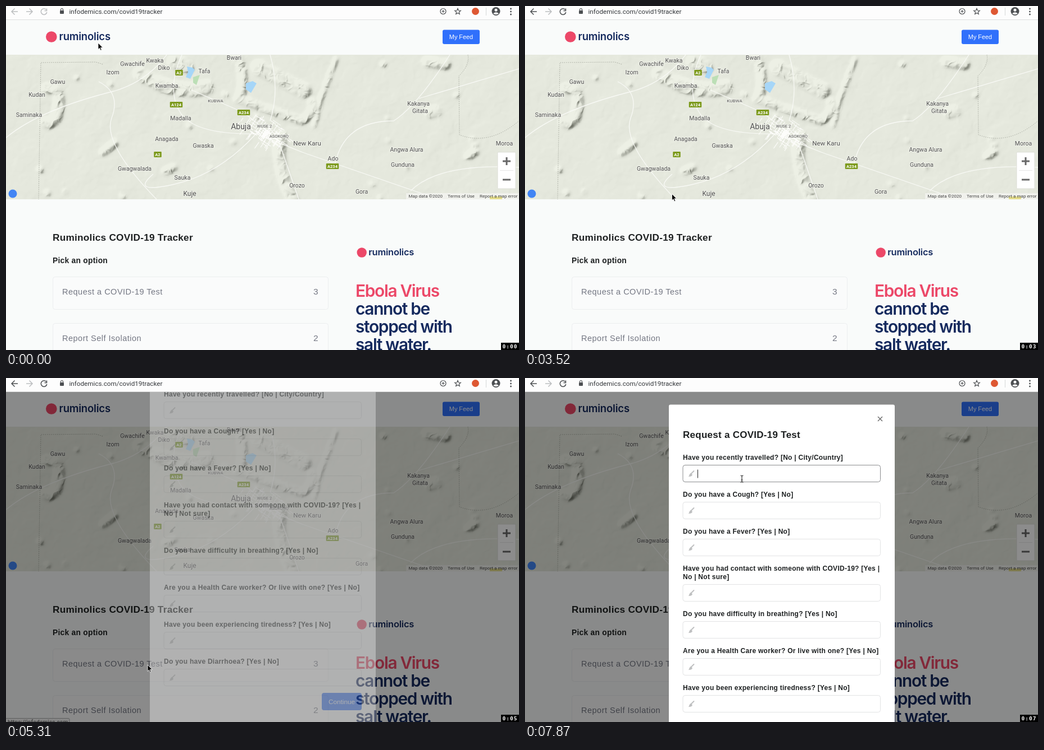
Animation of 913x614 px, one loop 8 s. Source, as an HTML page with a canvas:

```html
<!DOCTYPE html>
<html lang="en">
<head>
<meta charset="utf-8">
<title>Tracker walkthrough</title>
<style>
  html, body { margin: 0; width: 100%; height: 100%; overflow: hidden; background: #f9fbfa; }
  #stage { position: absolute; left: 0; top: 0; width: 913px; height: 614px; overflow: hidden; background: #f9fbfa; }
  #map { position: absolute; left: 0; top: 87px; }
  svg { position: absolute; left: 0; top: 0; }
  text { white-space: pre; }
  .page { font-family: "Liberation Sans", Arial, sans-serif; }
  .bold { font-weight: 700; letter-spacing: .27px; }
  .option { letter-spacing: .5px; }
  .brand { font-family: Inter, sans-serif; font-weight: 600; }
  .ui { font-family: Roboto, sans-serif; }
  .clock { font-family: "DejaVu Sans Mono", monospace; font-weight: 700; letter-spacing: 1px; }
  .place { font-family: Roboto, sans-serif; text-anchor: middle; paint-order: stroke; stroke: #f3f4ee; stroke-width: 2px; stroke-opacity: .75; }
  .mid { text-anchor: middle; }
</style>
</head>
<body>
<div id="stage">
  <canvas id="map" width="913" height="258"></canvas>
  <svg id="art" width="913" height="614" viewBox="0 0 913 614"></svg>
</div>
<script>
const LOOP = 8000, W = 913, MAP_H = 258, MAP_Y = 87;
const art = document.getElementById('art');

function el(parent, tag, attrs, content) {
  const node = document.createElementNS('http://www.w3.org/2000/svg', tag);
  for (const k in attrs) node.setAttribute(k, attrs[k]);
  if (content !== undefined) node.textContent = content;
  parent.appendChild(node);
  return node;
}
const group = () => el(art, 'g', {});
const rect = (p, x, y, width, height, fill, more) => el(p, 'rect', { x, y, width, height, fill, ...more });
const dot = (p, cx, cy, r, fill) => el(p, 'circle', { cx, cy, r, fill });
const line = (p, d, stroke, width = 1, more) =>
  el(p, 'path', { d, stroke, 'stroke-width': width, fill: 'none', ...more });
const text = (p, cls, s, x, y, size, fill, more) =>
  el(p, 'text', { class: cls, x, y, 'font-size': size, fill, ...more }, s);

// ---- Terrain: hill outlines are blurred into a mask, roughened and lit from the north-west ----
function hash(x, y) {
  let n = Math.imul(x, 374761393) + Math.imul(y, 668265263);
  n = Math.imul(n ^ (n >>> 13), 1274126177);
  return ((n ^ (n >>> 16)) >>> 0) / 4294967296;
}
function noise(x, y) {
  const ix = Math.floor(x), iy = Math.floor(y);
  let u = x - ix, v = y - iy;
  u = u * u * (3 - 2 * u);
  v = v * v * (3 - 2 * v);
  const a = hash(ix, iy), b = hash(ix + 1, iy), c = hash(ix, iy + 1), d = hash(ix + 1, iy + 1);
  return a + (b - a) * u + (c - a) * v + (a - b - c + d) * u * v;
}
const crag = (x, y, size) => 1 - Math.abs(2 * noise((x * .8 + y * .6) / size, (y * .8 - x * .6) / size) - 1);

const ranges = [
  ['M72 148Q98 142 94 178T70 208', 16],
  ['M240 122Q300 160 358 145M300 98L322 108', 22],
  ['M412 92Q430 130 415 165Q480 190 525 204Q550 195 545 172', 13],
  ['M450 110L530 150', 24],
  ['M490 232Q478 280 510 345', 17],
  ['M750 100L782 104M754 190L766 187', 16],
  ['M284 295L299 288M172 262L194 244M822 268L836 259', 10],
  ['M588 92L560 165 548 215', 5]
];
function hillMask() {
  const ctx = new OffscreenCanvas(W, MAP_H).getContext('2d');
  ctx.translate(0, -MAP_Y);
  ctx.lineCap = 'round';
  ctx.filter = 'blur(3px)';
  for (const [d, width] of ranges) {
    ctx.lineWidth = width;
    ctx.stroke(new Path2D(d));
  }
  for (let i = 0; i < 22; i++) {
    ctx.beginPath();
    ctx.arc(hash(i, 40) * W, MAP_Y + hash(i, 41) * MAP_H, 2 + hash(i, 42) * 3, 0, 7);
    ctx.fill();
  }
  return ctx.getImageData(0, 0, W, MAP_H).data;
}
function drawTerrain() {
  const ctx = document.getElementById('map').getContext('2d');
  const mask = hillMask(), heights = new Float32Array(W * MAP_H), img = ctx.createImageData(W, MAP_H);
  for (let y = 0; y < MAP_H; y++) for (let x = 0; x < W; x++) {
    const i = y * W + x, m = mask[i * 4 + 3] / 255;
    const wx = x + 9 * noise(x / 9, y / 9), wy = y + 9 * noise(x / 9 + 60, y / 9);
    let h = noise(wx / 30, wy / 30) * .25 + noise(wx / 8, wy / 8) * .05;
    if (m) h += m * (.3 + crag(wx, wy, 17) * .6 + crag(wx, wy, 7) * .2);
    heights[i] = h;
    const s = x && y ? h - heights[i - W - 1] : 0;
    const v = s > 0 ? Math.min(s * 150, 8) : Math.max(s * 200 - Math.max(0, -s - .05) * 450, -115);
    img.data.set([229 + v, 232 + v, 221 + v, 255], i * 4);
  }
  ctx.putImageData(img, 0, 0);
}
drawTerrain();

// ---- Map overlay ----
const map = el(art, 'svg', { x: 0, y: MAP_Y, width: W, height: MAP_H, viewBox: `0 ${MAP_Y} ${W} ${MAP_H}` });
el(map, 'path', { d: 'M322 108l10 2 4 4-8 16-8-3 4-9zM427 138l12-4 7 4-10 17-9-6z', fill: '#a6d6f8' });
el(map, 'path', { d: 'M333 127l12-4-6 18-6-4z', fill: '#bcdfb6' });
line(map, 'M172 104L160 100 62 101 58 345M822 87Q826 105 806 125L807 230Q860 250 913 205', '#a5a89e', 1, { 'stroke-dasharray': '1.5 2' });

const roads = [
  'M313 87Q285 150 310 190T445 228L530 262Q640 300 770 345',
  'M0 235Q60 185 192 152Q250 135 286 87',
  'M165 135Q205 155 188 200T268 345',
  'M330 150L423 190 485 240 521 345',
  'M445 228Q380 300 300 318T262 300',
  'M585 285Q600 205 690 205Q730 180 790 87M735 165L913 112',
  'M720 330Q770 280 913 288',
  'M470 87Q488 150 470 205'
];
line(map, roads.join(''), '#f8f9f5', 1.3);

// Street grid of the city, densest in the middle
let streets = '';
for (let i = 0; i < 120; i++) {
  const a = hash(i, 3) * 2 * Math.PI, r = hash(i, 5);
  const x = 462 + r * 48 * Math.cos(a), y = 224 + r * (28 * Math.sin(a) + 18 * Math.cos(a));
  const turn = .6 + (i % 2) * Math.PI / 2, len = 6 + hash(i, 9) * 12;
  streets += `M${x} ${y}l${Math.cos(turn) * len} ${Math.sin(turn) * len}`;
}
line(map, streets, '#fdfdfb', 1.1);

const places = [
  ['Kwaka', 265, 97], ['Bwari', 406, 92], ['Gwachife', 225, 103], ['Diko', 281, 110], ['Izom', 190, 118],
  ['Tafa', 353, 116], ['Gawu', 92, 135], ['Kwamba', 286, 142], ['Kudan', 55, 158], ['Saminaka', 41, 194],
  ['Madalla', 311, 200], ['Anagada', 286, 237], ['Gwaska', 351, 249], ['Gwagwalada', 229, 290], ['Sauka', 314, 306],
  ['Orozo', 518, 320], ['Ado', 582, 272], ['Gora', 633, 331], ['Gunduna', 706, 283], ['Angwa Alura', 713, 256],
  ['Kakanya', 734, 174], ['Gitata', 737, 187], ['Moroa', 887, 245], ['Kuje', 327, 335, 12],
  ['New Karu', 536, 245, 11.5], ['Abuja', 418, 215, 14], ['KUBWA', 373, 169, 8], ['WUSE 2', 460, 214, 7.5], ['ASOKORO', 486, 232, 7.5]
];
for (const [name, x, y, size = 10.5] of places)
  text(map, 'place', name, x, y + size * .36, size, '#505050');
for (const [name, x, y] of [['A2', 308, 119], ['A124', 303, 176], ['A234', 423, 190], ['A2', 270, 265], ['A234', 581, 286]]) {
  const w = 4.5 + name.length * 4.5;
  rect(map, x - w / 2, y - 5, w, 10, '#7c9a1c', { rx: 1 });
  text(map, 'ui mid', name, x, y + 2.8, 7.5, '#fff', { 'font-weight': 700 });
}
dot(map, 12, 335, 7.5, '#4285f4');
rect(map, 712, 334, 201, 11, '#f5f5f2', { opacity: .75 });
rect(map, 861, 340, 22, 5, '#e3dc8a');
text(map, 'ui', 'Map data ©2020', 716.5, 342, 8.1, '#444');
text(map, 'ui', 'Terms of Use', 786, 342, 8.1, '#444');
text(map, 'ui', 'Report a map error', 843, 342, 8.1, '#444');
rect(map, 875, 261, 32, 65, '#fff', { rx: 1.5, stroke: '#d8dad4', 'stroke-width': .8 });
line(map, 'M879 293.5h24', '#e6e6e6');
line(map, 'M884 277h14M891 270v14M884 310h14', '#666', 3);

// ---- Page ----
const page = group();
const INK = '#1d2021', NAVY = '#152a5e', GREY = '#747783', PINK = '#ec4868', BLUE = '#3070fb';
function logo(x, y, size) {
  dot(page, x + size * .53, y, size * .53, PINK);
  text(page, 'brand', 'ruminolics', x + size * 1.27, y + size * .33, size, NAVY, { 'letter-spacing': -.2 });
}
logo(71, 55, 18.5);
logo(624.5, 440, 16.4);
rect(page, 777, 42.5, 66, 25.5, BLUE, { rx: 3 });
text(page, 'page mid', 'My Feed', 810, 59, 10.9, '#fff');
text(page, 'page bold', 'Ruminolics COVID-19 Tracker', 83, 419, 17.2, INK);
text(page, 'page bold', 'Pick an option', 83, 458.5, 13.8, INK);
[['Request a COVID-19 Test', 3], ['Report Self Isolation', 2]].forEach(([s, n], i) => {
  const y = 483.5 + i * 83;
  rect(page, 83.5, y, 490, 58, '#fafbfb', { rx: 4, stroke: '#eceeef' });
  text(page, 'page option', s, 100, y + 31, 14.5, GREY);
  text(page, 'page', n, 547, y + 31, 15.5, GREY);
});
['Ebola Virus', 'cannot be', 'stopped with', 'salt water.'].forEach((s, i) =>
  text(page, 'brand', s, 622, 519 + i * 32, 29.8, i ? NAVY : PINK, { 'letter-spacing': -1.3 }));

// ---- Status bubble, shade, dialog ----
const status = group();
rect(status, -1, 607.5, 114, 10, '#f1f2f2', { rx: 2, stroke: '#a9abab' });
text(status, 'ui', 'https://infodemics.com', 3, 618, 10.3, '#555');
const shade = rect(art, 0, 25, W, 589, '#000');

const modal = group();
rect(modal, 256, 47.5, 402, 700, '#fff', { rx: 3 });
line(modal, 'M628 69l8 8M636 69l-8 8', '#707070', 1.5);
text(modal, 'page bold', 'Request a COVID-19 Test', 281, 107, 17, INK);
const questions = [
  'Have you recently travelled? [No | City/Country]',
  'Do you have a Cough? [Yes | No]',
  'Do you have a Fever? [Yes | No]',
  'Have you had contact with someone with COVID-19? [Yes |\nNo | Not sure]',
  'Do you have difficulty in breathing? [Yes | No]',
  'Are you a Health Care worker? Or live with one? [Yes | No]',
  'Have you been experiencing tiredness? [Yes | No]',
  'Do you have Diarrhoea? [Yes | No]'
];
let row = 131;
const inputs = questions.map(q => {
  for (const s of q.split('\n')) text(modal, 'page bold', s, 281, row += 15, 12, INK);
  const y = row + 9.5;
  const box = rect(modal, 281, y, 351.5, 30, '#fff', { rx: 4 });
  line(modal, `M296 ${y + 15}l4.5 -4.5`, '#bfc0c1', 2, { 'stroke-linecap': 'round' });
  el(modal, 'path', { d: `M295 ${y + 14}l3 3q-1 4 -7.5 3.5q2 -1 2 -3.5z`, fill: '#bfc0c1' });
  row += 51;
  return box;
});
inputs.forEach(box => box.setAttribute('stroke', '#e2e3e4'));
const caret = line(modal, 'M307.5 163.5v15', '#222');
rect(modal, 562, 675, 71, 31, BLUE, { rx: 4 });
text(modal, 'page mid', 'Continue', 597.5, 695, 11.8, '#fff');

// ---- Browser bar ----
const bar = group(), IDLE = '#bcbec0', LIVE = '#4c4f52';
rect(bar, 0, 0, W, 25, '#fdfdfd');
line(bar, 'M0 24.5H913', '#dcdddd');
const nav = line(bar, 'M21 10H10.5M15.5 4.5L10 10l5.5 5.5M71.5 6.5A5.3 5.3 0 1 0 72.8 11M72.5 4.5v4h-4', IDLE, 1.5);
line(bar, 'M36 10H46.5M41.5 4.5L47 10l-5.5 5.5', IDLE, 1.5);
rect(bar, 96, 8, 7, 6, LIVE, { rx: 1 });
line(bar, 'M97.5 8.5V6.5a2 2 0 0 1 4 0v2', LIVE, 1.2);
text(bar, 'ui', 'infodemics.com/covid19tracker', 112.5, 13.8, 11.7, '#33363a');
line(bar, 'M778 7v5M775.5 9.5h5M783 9.5a5 5 0 1 0-10 0a5 5 0 1 0 10 0', LIVE, 1.2);
let star = '';
for (let i = 0; i < 10; i++) {
  const a = i * Math.PI / 5, r = i % 2 ? 2.5 : 5.6;
  star += `${i ? 'L' : 'M'}${804 + r * Math.sin(a)} ${10 - r * Math.cos(a)}`;
}
line(bar, star + 'z', LIVE, 1.2);
dot(bar, 835.5, 9.5, 6.5, '#de5833');
line(bar, 'M854.5 3v14', '#d5d7d8');
dot(bar, 872, 9.5, 7.5, LIVE);
dot(bar, 872, 7.2, 2.5, '#fff');
el(bar, 'path', { d: 'M867 13.5q5-4.5 10 0q-5 3.5-10 0z', fill: '#fff' });
for (let y = 5; y <= 15; y += 5) dot(bar, 898.5, y, 1.4, LIVE);

// ---- Pointer and clock ----
const cursor = group();
const looks = {
  arrow: el(cursor, 'path', { d: 'M0 0V11.5L2.6 9.1 4.3 13.2 6.2 12.4 4.5 8.3H8.2Z', fill: '#000', stroke: '#fff', 'stroke-width': .8 }),
  hand: el(cursor, 'path', { d: 'M2.5 8V2q1.2-1.6 2.2 0v4q3-1 6 1.6v3.4l-1.5 4H4.2L.6 10.5Q-.6 8 1.3 8.2L2.5 9.5z', fill: '#fff', stroke: '#111', 'stroke-width': 1.1 }),
  beam: line(cursor, 'M-2.5-6q2.500 0 2.500 1.500q0-1.500 2.500-1.500M0-4.5v9M-2.5 6q2.500 0 2.500-1.500q0 1.500 2.500 1.500M-1.5 2h3', '#222', 1.1)
};
rect(art, 881, 601, 32, 13, '#000');
const clock = text(art, 'clock', '', 883.5, 611, 9.5, '#fff');

// ---- Motion ----
const STEP = 140;
// First step, last step, place reached
const moves = [
  [140, 560, 119, 28], [700, 1120, 150, 50], [1260, 2240, 190, 9], [2390, 3230, 264, 300],
  [3520, 4260, 249, 513], [5160, 5160, 252, 512], [5600, 5600, 251, 508], [5740, 5740, 325, 400],
  [6040, 6430, 380, 184], [6730, 7420, 386, 180]
];
function pointerAt(t) {
  let x = 164, y = 66;
  for (const [from, to, endX, endY] of moves) {
    if (t < from) break;
    const steps = Math.round((to - from) / STEP) + 1;
    const p = Math.min(1, (Math.floor((t - from) / STEP) + 1) / steps);
    x += (endX - x) * p;
    y += (endY - y) * p;
  }
  return [x, y];
}
const show = (node, on) => node.setAttribute('visibility', on ? 'visible' : 'hidden');

function draw(t) {
  cursor.setAttribute('transform', `translate(${pointerAt(t)})`);
  const look = t >= 4110 && t < 5160 ? 'hand' : t >= 6430 ? 'beam' : 'arrow';
  for (const name in looks) show(looks[name], name === look);

  // The shade comes first; the dialog then drops in, slowing down
  const step = Math.max(0, Math.floor((t - 5160) / 145) + 1);
  const drop = Math.min(1, Math.max(0, (step - 1) / 3));
  shade.setAttribute('opacity', Math.min(.45, step * .28));
  modal.setAttribute('opacity', drop);
  modal.setAttribute('transform', `translate(0 ${-254 * (1 - drop) ** 2})`);

  const focused = t >= 6880;
  inputs[0].setAttribute('stroke', focused ? '#8b8d8f' : '#e2e3e4');
  show(caret, focused && (t < 7420 || t >= 7870));
  show(status, t >= 4260 && t < 5450);
  nav.setAttribute('stroke', t < 3520 ? IDLE : LIVE);
  clock.textContent = '0:0' + Math.max(0, Math.floor((t - 100) / 1000));
}

draw(0);
const start = performance.now();
function tick() {
  draw((performance.now() - start) % LOOP);
  requestAnimationFrame(tick);
}
requestAnimationFrame(tick);
</script>
</body>
</html>
```
